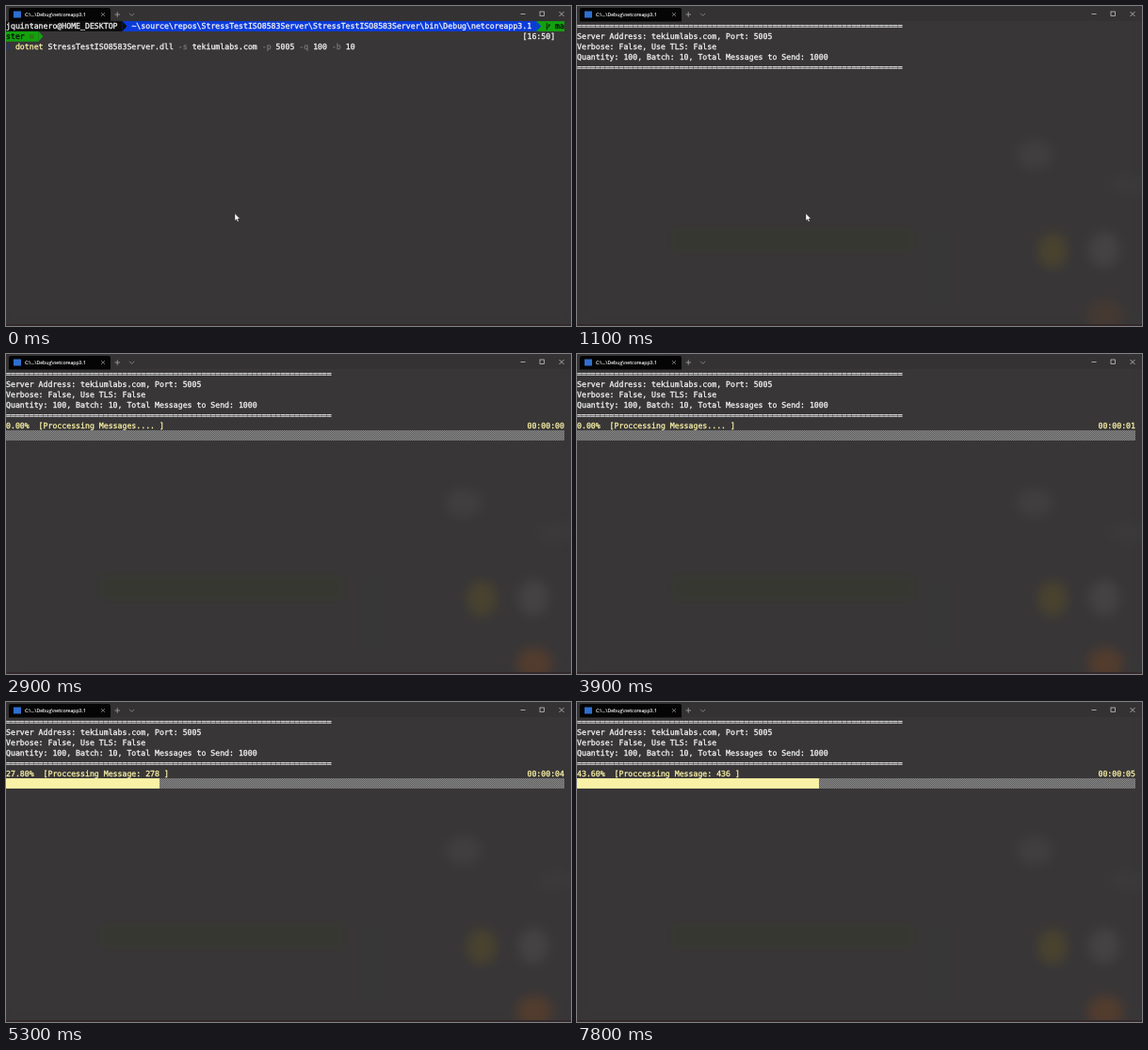
An HTML page for the animation above (8000 ms loop, 600 by 340 pixels).

```html
<!DOCTYPE html>
<html lang="en">
<head>
<meta charset="utf-8">
<title>Terminal stress test</title>
<style>
  html, body { margin: 0; width: 100%; height: 100%; overflow: hidden; background: #383637; }
  svg { display: block; }
  text { white-space: pre; text-rendering: geometricPrecision; }
  .mono { font: 8.21px "DejaVu Sans Mono", monospace; stroke-width: .3px; }
  .title { font: 5.15px "Open Sans", "Noto Sans", sans-serif; fill: #fff; stroke: #fff; stroke-width: .12px; }
  .icon { fill: none; stroke: #d8d8d8; stroke-width: .7; }
</style>
</head>
<body>
<svg width="600" height="340" viewBox="0 0 600 340">
  <defs>
    <pattern id="shade" width="2" height="2" patternUnits="userSpaceOnUse">
      <rect width="2" height="2" fill="#5e5d5e"/>
      <path d="M0 0h1v1h-1zM1 1h1v1h-1z" fill="#8a898a"/>
    </pattern>
    <filter id="soft" x="-60%" y="-60%" width="220%" height="220%" color-interpolation-filters="sRGB">
      <feGaussianBlur stdDeviation="6"/>
    </filter>
  </defs>

  <rect width="600" height="340" fill="#383637"/>

  <!-- blurred desktop behind the window -->
  <g filter="url(#soft)">
    <rect width="600" height="340" fill="#383637"/>
    <g id="upper">
      <ellipse cx="486" cy="158" rx="19" ry="15" fill="#413e40"/>
      <ellipse cx="585" cy="190" rx="22" ry="10" fill="#3b393a"/>
    </g>
    <g id="lower">
      <rect x="100" y="235" width="258" height="27" fill="#373731"/>
      <rect x="376" y="238" width="22" height="80" fill="#373738"/>
      <ellipse cx="505" cy="260" rx="16" ry="19" fill="#48422f"/>
      <ellipse cx="560" cy="259" rx="16" ry="19" fill="#444243"/>
    </g>
    <ellipse id="ember" cx="561" cy="329" rx="19" ry="17" fill="#523c2e"/>
  </g>
  <rect y="338" width="600" height="2" fill="#33292b"/>

  <!-- title bar -->
  <rect width="600" height="16" fill="#343233"/>
  <path d="M3 16.5V4q0-2 2-2h104q2 0 2 2v12.5z" fill="#050505"/>
  <rect x="8" y="5.5" width="8" height="7" fill="#2f6fd0"/>
  <text class="title" x="20" y="11">C:\...\Debug\netcoreapp3.1</text>
  <g class="icon">
    <path d="M101 7l4 4m0-4l-4 4" stroke="#a8a8a8" stroke-width=".6"/>
    <path d="M115.5 9h5.5m-2.75-2.75v5.5" stroke="#b5b5b5"/>
    <path d="M131 7.8l2.6 2.6 2.6-2.6" stroke="#a0a0a0"/>
    <path d="M546.5 8.5h5"/>
    <rect x="567" y="6" width="4.6" height="4.6"/>
    <path d="M587.5 6l5 5m0-5l-5 5"/>
  </g>

  <g id="prompt"></g>
  <g id="header"></g>
  <g id="progress"></g>
  <rect id="caret" x="0" y="48.8" width="1" height="10.4" fill="#f2f2f2"/>
  <path id="mouse" d="M243 220.6v7.6l1.7-1.6 1.2 2.6 1.3-.6-1.2-2.5h2.4z" fill="#fff" stroke="#1a1a1a" stroke-width=".4"/>
</svg>

<script>
const NS = "http://www.w3.org/2000/svg";
const LOOP = 8000, STEP = 100;
const COL = 593 / 120, ROW = 10.83, TOP = 16.1;
const WHITE = "#f2f2f2", GRAY = "#767676", YELLOW = "#f9f1a5";
const BLUE = "#0a3bdc", GREEN = "#13a10e", BLACK = "#0c0c0c";

// time, messages done
const COUNTS = [
  [4100, 0], [4500, 186], [4700, 222], [5000, 262], [5300, 278],
  [6000, 278], [6400, 376], [6800, 412], [7000, 412], [7400, 436]
];
// time, clock seconds
const CLOCK = [[0, 0], [3100, 1], [4200, 3], [4900, 4], [6100, 5]];

const $ = id => document.getElementById(id);

function add(parent, tag, attrs) {
  const el = document.createElementNS(NS, tag);
  for (const key in attrs) el.setAttribute(key, attrs[key]);
  return parent.appendChild(el);
}

function write(parent, col, row, str, color = WHITE) {
  const el = add(parent, "text", {
    class: "mono", x: col * COL, y: TOP + row * ROW + 8.3, fill: color, stroke: color
  });
  el.textContent = str;
  return el;
}

function block(parent, col, row, cols, fill) {
  return add(parent, "rect", {
    x: col * COL, y: TOP + row * ROW, width: cols * COL, height: ROW, fill
  });
}

function arrow(parent, col, row, fill) {
  const x = col * COL, y = TOP + row * ROW;
  add(parent, "path", { d: `M${x - .1} ${y}l${COL} ${ROW / 2}l${-COL} ${ROW / 2}z`, fill });
}

function buildPrompt(g) {
  block(g, 0, 0, 25, BLACK);
  block(g, 25, 0, 89, BLUE);
  block(g, 114, 0, 6, GREEN);
  arrow(g, 25, 0, BLACK);
  arrow(g, 114, 0, BLUE);
  write(g, 0, 0, "jquintanero@HOME_DESKTOP");
  write(g, 27, 0, "~\\source\\repos\\StressTestISO8583Server\\StressTestISO8583Server\\bin\\Debug\\netcoreapp3.1");
  add(g, "path", {
    d: "M574.3 18v7.5m0-2.2q2.6-.2 2.6-3.4m-1.2 1.1l1.2-1.6 1.2 1.6",
    fill: "none", stroke: BLACK, "stroke-width": .8
  });
  write(g, 118, 0, "ma", BLACK);

  block(g, 0, 1, 7, GREEN);
  arrow(g, 7, 1, GREEN);
  write(g, 0, 1, "ster", BLACK);
  write(g, 5, 1, "\u2261", "#3c6a12");
  write(g, 111, 1, "[16:50]");

  write(g, 0, 2, "\u276f", "#24387c");
  let col = 2;
  const command = "dotnet StressTestISO8583Server.dll -s tekiumlabs.com -p 5005 -q 100 -b 10";
  command.split(" ").forEach((word, i) => {
    write(g, col, 2, word, i === 0 ? YELLOW : word[0] === "-" ? GRAY : WHITE);
    col += word.length + 1;
  });
}

function buildHeader(g) {
  const rule = "=".repeat(70);
  [
    rule,
    "Server Address: tekiumlabs.com, Port: 5005",
    "Verbose: False, Use TLS: False",
    "Quantity: 100, Batch: 10, Total Messages to Send: 1000",
    rule
  ].forEach((line, row) => write(g, 0, row, line));
}

buildPrompt($("prompt"));
buildHeader($("header"));
const progress = $("progress");
const label = write(progress, 0, 5, "", YELLOW);
const clock = write(progress, 112, 5, "", YELLOW);
block(progress, 0, 6, 120, "url(#shade)");
const bar = block(progress, 0, 6, 0, YELLOW);

const clamp = v => Math.max(0, Math.min(1, v));
const show = (id, on) => { $(id).style.display = on ? "" : "none"; };

function countAt(t) {
  let [t0, n0] = COUNTS[0];
  for (const [t1, n1] of COUNTS) {
    if (t < t1) return Math.round(n0 + (n1 - n0) * clamp((t - t0) / (t1 - t0)));
    [t0, n0] = [t1, n1];
  }
  return n0;
}

function draw(time) {
  const t = Math.floor(time / STEP) * STEP;
  const count = countAt(t);
  const seconds = CLOCK.filter(c => c[0] <= t).pop()[1];

  $("upper").style.opacity = clamp(t / 800);
  $("lower").style.opacity = t >= 1000 ? 1 : 0;
  $("ember").style.opacity = clamp((t - 1000) / 200);
  show("prompt", t < 1100);
  show("caret", t === 1000);
  show("header", t >= 1100);
  show("progress", t >= 1200);
  show("mouse", t < 1900);

  const task = count ? `Message: ${count}` : "Messages....";
  label.textContent = `${(count / 10).toFixed(2)}%  [Proccessing ${task} ]`;
  clock.textContent = `00:00:0${seconds}`;
  bar.setAttribute("width", Math.floor(count * 120 / 1000) * COL);
}

const start = performance.now();
function tick() {
  draw((performance.now() - start) % LOOP);
  requestAnimationFrame(tick);
}
tick();
</script>
</body>
</html>
```
